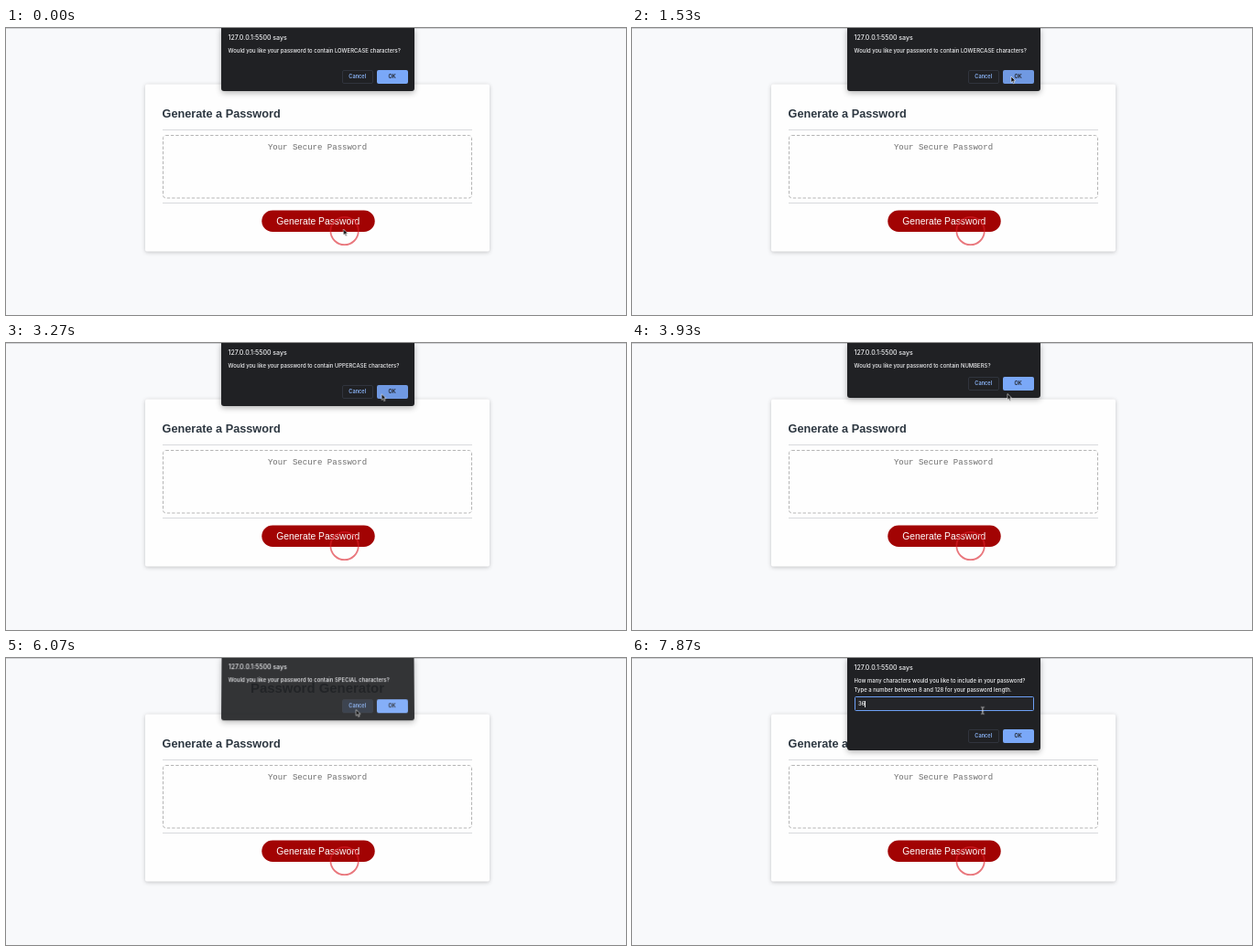
Write an HTML page that moves like this. It is 677 px wide and 314 px high and loops after 8 s.

```html
<!DOCTYPE html>
<html lang="en">
<head>
<meta charset="utf-8">
<title>Password Generator</title>
<style>
  :root {
    --open: perspective(200px);
    --shut: translateY(-9px) perspective(200px) rotateX(10deg) scaleY(1.06);
  }
  html, body { margin: 0; width: 100%; height: 100%; overflow: hidden; background: #f8f9fb; }
  #stage { position: relative; width: 677px; height: 314px; overflow: hidden; }
  #page, #pointer { position: absolute; left: 0; top: 0; }
  #page text { font-family: "Liberation Sans", Arial, sans-serif; fill: #2d3741; }
  #page .mono { font-family: "Liberation Mono", Courier, monospace; fill: #6c6c6c; }
  .card { fill: #fefefe; filter: drop-shadow(0 1px 2px rgba(0, 0, 0, .22)); }

  .dialog {
    position: absolute; left: 234.5px; top: 0; width: 211px; height: 69px;
    background: #202124; border-radius: 0 0 3px 3px;
    box-shadow: 0 2px 6px rgba(0, 0, 0, .3);
    transform-origin: 50% 100%;
    font: 500 5.95px/9.5px Inter, sans-serif; color: #f0f1f3; white-space: nowrap;
    animation: 8s linear infinite;
  }
  .dialog h3, .dialog p { position: absolute; left: 7.6px; margin: 0; }
  .dialog h3 { top: 6px; font-size: 7px; line-height: 10px; font-weight: 500; }
  .dialog p { top: 20px; }
  .button {
    position: absolute; bottom: 8px; height: 15px; box-sizing: border-box;
    border-radius: 2px; text-align: center; line-height: 15px; font-size: 5.6px; font-weight: 600;
    animation: 8s step-end infinite;
  }
  .cancel { left: 132px; width: 33.5px; border: .7px solid #30343d; line-height: 13.6px; color: #8ab4f8; }
  .ok { left: 169.5px; width: 34px; background: #7aa8f8; color: #202124; }

  #lower { animation-name: lower; }
  #upper { animation-name: upper; }
  #numbers { height: 60px; animation-name: numbers; }
  #special { animation-name: special; }
  #length { height: 101px; animation-name: length; }
  #lower .ok { animation-name: hover-lower; }
  #upper .ok { animation-name: hover-upper; }
  #numbers .ok { animation-name: hover-numbers; }
  #special .cancel { animation-name: hover-cancel; }

  .field {
    position: absolute; left: 7.5px; top: 42px; width: 196px; height: 16px; box-sizing: border-box;
    border: 1px solid #6da0f5; border-radius: 1.5px; background: #242529;
    padding-left: 3.5px; line-height: 13.5px; display: flex; align-items: center;
  }
  .digit { width: 0; overflow: hidden; animation: 8s step-end infinite; }
  .three { animation-name: type-three; }
  .six { animation-name: type-six; }
  .caret { width: .8px; height: 7px; background: #eee; animation: blink 8s step-end infinite; }

  #pointer { animation: move 8s ease-in-out infinite; }
  .arrow { animation: arrow 8s step-end infinite; }
  .beam { animation: beam 8s step-end infinite; }

  @keyframes lower {
    0%, 20.875% { opacity: 1; transform: var(--open); animation-timing-function: ease-in; }
    23.125%, 100% { opacity: 0; transform: var(--shut); }
  }
  @keyframes upper {
    0%, 21.25% { opacity: 0; transform: var(--shut); }
    23.75%, 45% { opacity: 1; transform: var(--open); animation-timing-function: ease-in; }
    47.25%, 100% { opacity: 0; transform: var(--shut); }
  }
  @keyframes numbers {
    0%, 45.375% { opacity: 0; transform: var(--shut); }
    47.875%, 60% { opacity: 1; transform: var(--open); animation-timing-function: ease-in; }
    62.25%, 100% { opacity: 0; transform: var(--shut); }
  }
  @keyframes special {
    0%, 60.375% { opacity: 0; transform: var(--shut); }
    62.875%, 75.375% { opacity: 1; transform: var(--open); animation-timing-function: ease-in; }
    77.625%, 100% { opacity: 0; transform: var(--shut); }
  }
  @keyframes length {
    0%, 76% { opacity: 0; transform: var(--shut); }
    78.5%, 100% { opacity: 1; transform: var(--open); }
  }
  @keyframes hover-lower { 0% { background: #7aa8f8; } 9.5%, 100% { background: #7099e2; } }
  @keyframes hover-upper { 0% { background: #7aa8f8; } 33.5%, 100% { background: #7099e2; } }
  @keyframes hover-numbers { 0% { background: #7aa8f8; } 55.5%, 100% { background: #7099e2; } }
  @keyframes hover-cancel { 0% { background: transparent; } 69%, 100% { background: #2b3340; } }
  @keyframes type-three { 0% { width: 0; } 95.875%, 100% { width: auto; } }
  @keyframes type-six { 0% { width: 0; } 98.375%, 100% { width: auto; } }
  @keyframes blink { 0% { opacity: 1; } 84.5% { opacity: 0; } 90.75%, 100% { opacity: 1; } }
  @keyframes move {
    0%, 1% { transform: translate(368.5px, 220px); }
    11%, 21% { transform: translate(414px, 53px); }
    26%, 33% { transform: translate(411.5px, 56.5px); }
    44%, 52% { transform: translate(410px, 55.5px); }
    57%, 64% { transform: translate(408.8px, 50px); }
    72.5%, 100% { transform: translate(382.3px, 56.5px); }
  }
  @keyframes arrow { 0% { opacity: 1; } 77.5%, 100% { opacity: 0; } }
  @keyframes beam { 0% { opacity: 0; } 77.5%, 100% { opacity: 1; } }
</style>
</head>
<body>
<div id="stage">
  <svg id="page" width="677" height="314">
    <rect width="677" height="1" fill="#cfd0d3"/>
    <text x="340" y="38.3" text-anchor="middle" font-size="14.95" font-weight="700">Password Generator</text>
    <rect class="card" x="152" y="61.5" width="376" height="183" rx="2"/>
    <text x="170.6" y="97.6" font-size="12.7" font-weight="700">Generate a Password</text>
    <path d="M171 111.5H509M171 191.5H509" stroke="#d8d9dc"/>
    <rect x="171.5" y="117.5" width="337" height="68.5" rx="3" fill="none" stroke="#b5b5b5" stroke-dasharray="3.4 2"/>
    <text class="mono" x="340" y="133" text-anchor="middle" font-size="9.02">Your Secure Password</text>
    <rect x="279.3" y="199.5" width="123.4" height="23.5" rx="11.75" fill="#a20303"/>
    <text x="340.8" y="214.7" text-anchor="middle" font-size="10.3" style="fill:#fff">Generate Password</text>
    <circle cx="369.6" cy="222" r="15.2" fill="none" stroke="#dc1e28" stroke-opacity=".6" stroke-width="1.8"/>
  </svg>

  <div class="dialog" id="lower">
    <h3>127.0.0.1:5500 says</h3>
    <p>Would you like your password to contain LOWERCASE characters?</p>
    <span class="button cancel">Cancel</span><span class="button ok">OK</span>
  </div>
  <div class="dialog" id="upper">
    <h3>127.0.0.1:5500 says</h3>
    <p>Would you like your password to contain UPPERCASE characters?</p>
    <span class="button cancel">Cancel</span><span class="button ok">OK</span>
  </div>
  <div class="dialog" id="numbers">
    <h3>127.0.0.1:5500 says</h3>
    <p>Would you like your password to contain NUMBERS?</p>
    <span class="button cancel">Cancel</span><span class="button ok">OK</span>
  </div>
  <div class="dialog" id="special">
    <h3>127.0.0.1:5500 says</h3>
    <p>Would you like your password to contain SPECIAL characters?</p>
    <span class="button cancel">Cancel</span><span class="button ok">OK</span>
  </div>
  <div class="dialog" id="length">
    <h3>127.0.0.1:5500 says</h3>
    <p>How many characters would you like to include in your password?<br>Type a number between 8 and 128 for your password length.</p>
    <div class="field"><span class="digit three">3</span><span class="digit six">6</span><span class="caret"></span></div>
    <span class="button cancel">Cancel</span><span class="button ok">OK</span>
  </div>

  <svg id="pointer" width="12" height="12" overflow="visible">
    <path class="arrow" d="M0 0V6.6L1.5 5.2L2.6 7.8L3.7 7.3L2.6 4.8H4.7Z" fill="#000" stroke="#fff" stroke-width=".6"/>
    <path class="beam" d="M-1.2 -2.8Q.6 -2.8 .6 -1.8Q.6 -2.8 2.4 -2.8M.6 -1.8V3.8M-1.2 4.8Q.6 4.8 .6 3.8Q.6 4.8 2.4 4.8M-.3 1.8H1.5" fill="none" stroke="#e4e4e4" stroke-width=".8"/>
  </svg>
</div>
</body>
</html>
```
